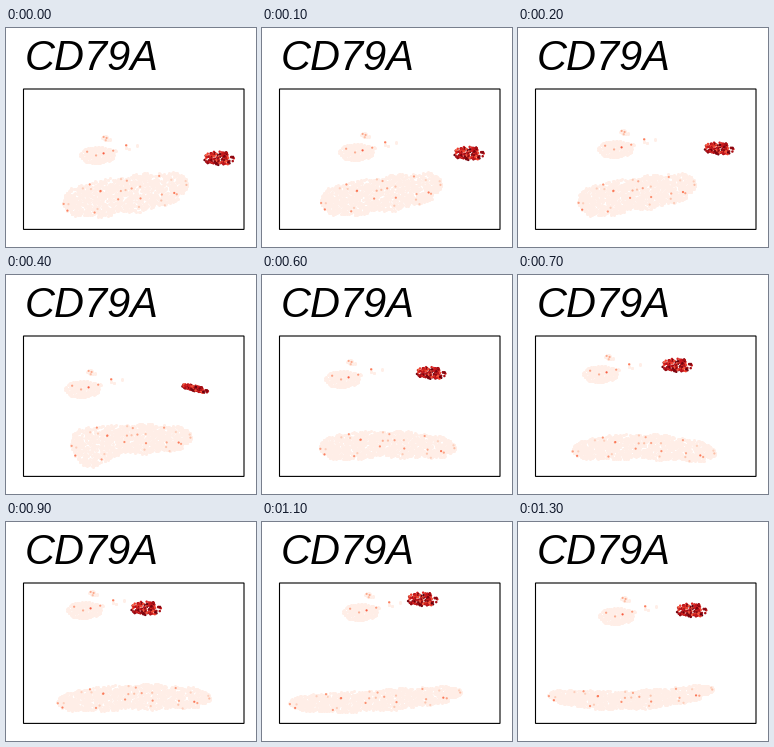
A matplotlib script for the animation above (1500 ms loop, 250 by 219 pixels).

```python
import numpy as np
import matplotlib.pyplot as plt
from matplotlib.animation import FuncAnimation
from matplotlib.patches import Rectangle

W, H, DPI = 250, 219, 100
STEP, LOOP = 100, 1500
# Times in ms at which the cells jump; between them the picture holds still.
JUMPS = (0, 100, 200, 400, 500, 600, 700, 900, 1100, 1300)

# Key points of each moving part, linearly joined.
KEY_TIMES = (0, 200, 400, 700, 900, 1100, 1300)
TRACKS = dict(
    red_x=(213, 201, 189, 159, 140, 160.5, 173.5),
    red_y=(130.5, 120.7, 113.5, 90.5, 86.5, 77.5, 88.5),
    body_x=(91, 97, 76, 82, 78, 98, 98),
    body_y=(127, 121, 114, 99, 88, 90, 94),
    left=(57, 60, 65, 54, 51, 27, 30),
    right=(181, 177, 185, 197, 204, 199, 195),
    left_y=(174, 172, 164, 175, 180, 181, 173),
    right_y=(156, 156, 162, 178, 176, 170, 167),
    sag=(2, 2, 1, -5, -3, 3, 8),
    half=(18, 16, 14, 12, 12, 10, 9),
)

rng = np.random.default_rng(7)
reds = plt.get_cmap("Reds")


def disk(count):
    angle = rng.uniform(0, 2 * np.pi, count)
    return np.sqrt(rng.random((count, 1))) * np.column_stack([np.cos(angle), np.sin(angle)])


def bell(x, center, width):
    return np.exp(-((x - center) / width) ** 2)


band_u, band_v = rng.random(1500), rng.uniform(-1, 1, 1500)
body_cells, bump_cells, red_cells = disk(260), disk(14), disk(150)
tail_cells = np.column_stack([rng.uniform(15, 41, 12), rng.normal(0, 1.2, 12)])


def band(p, leg):
    """Long bent strip with ragged edges and a foot hanging from its left part."""
    u, v = band_u, band_v
    taper = np.sqrt(1 - np.abs(2 * u - 1) ** 4)
    ragged = 1 + 0.07 * np.sin(23 * u) + 0.05 * np.sin(61 * u + 2 * v)
    x = p["left"] + (p["right"] - p["left"]) * u
    middle = p["left_y"] + (p["right_y"] - p["left_y"]) * u + p["sag"] * np.sin(np.pi * u)
    foot = leg * bell(u, 0.15, 0.16) * (v + 1) / 2
    return np.column_stack([x, middle + p["half"] * taper * ragged * v + foot])


def island(p):
    """Oval body with a small bump above it and a sparse tail to the right."""
    center = np.array([p["body_x"], p["body_y"]])
    tail = tail_cells - [0, 9] * (tail_cells[:, :1] / 41)
    shape = np.vstack([tail, bump_cells * [5, 3.5] + [9, -17], body_cells * [17.5, 8.5]])
    return center + shape


fig = plt.figure(figsize=(W / DPI, H / DPI), dpi=DPI, facecolor="white")
ax = fig.add_axes([0, 0, 1, 1])
ax.set(xlim=(0, W), ylim=(H, 0))
ax.axis("off")
ax.add_patch(Rectangle((17.5, 61), 220.5, 140.4, fill=False, ec="black",
                       lw=0.8, snap=False))
ax.text(18.7, 41.5, "CD79A", family="Liberation Sans", style="italic",
        size=41.5 * 72 / DPI, va="baseline")


def dots(colors, diameter, count):
    return ax.scatter(np.zeros(count), np.zeros(count), c=colors, linewidths=0,
                      s=(diameter * 72 / DPI) ** 2)


BAND_SPECKS, ISLAND_SPECKS = 28, 8
speck_count = BAND_SPECKS + ISLAND_SPECKS
pale = dots([reds(0.04)], 3, 1)
specks = dots(reds(0.18 + 0.36 * rng.random(speck_count) ** 1.6), 2.2, speck_count)
red = dots(reds(1 - 0.5 * rng.random(len(red_cells)) ** 1.3), 2.5, len(red_cells))


def update(step):
    t = max(jump for jump in JUMPS if jump <= step * STEP)
    p = {name: np.interp(t, KEY_TIMES, values) for name, values in TRACKS.items()}
    squash = bell(t, 400, 160)
    low, up = band(p, 16 * squash), island(p)
    pale.set_offsets(np.vstack([low, up]))
    specks.set_offsets(np.vstack([low[:BAND_SPECKS], up[::6][:ISLAND_SPECKS]]))
    cluster = red_cells * [15.5 - 2 * squash, 7 - 4 * squash]
    cluster[:, 1] += 3 * squash * red_cells[:, 0]
    red.set_offsets(cluster + [p["red_x"], p["red_y"]])
    return pale, specks, red


animation = FuncAnimation(fig, update, frames=LOOP // STEP, interval=STEP,
                          repeat=True, repeat_delay=0)
plt.show()
```
